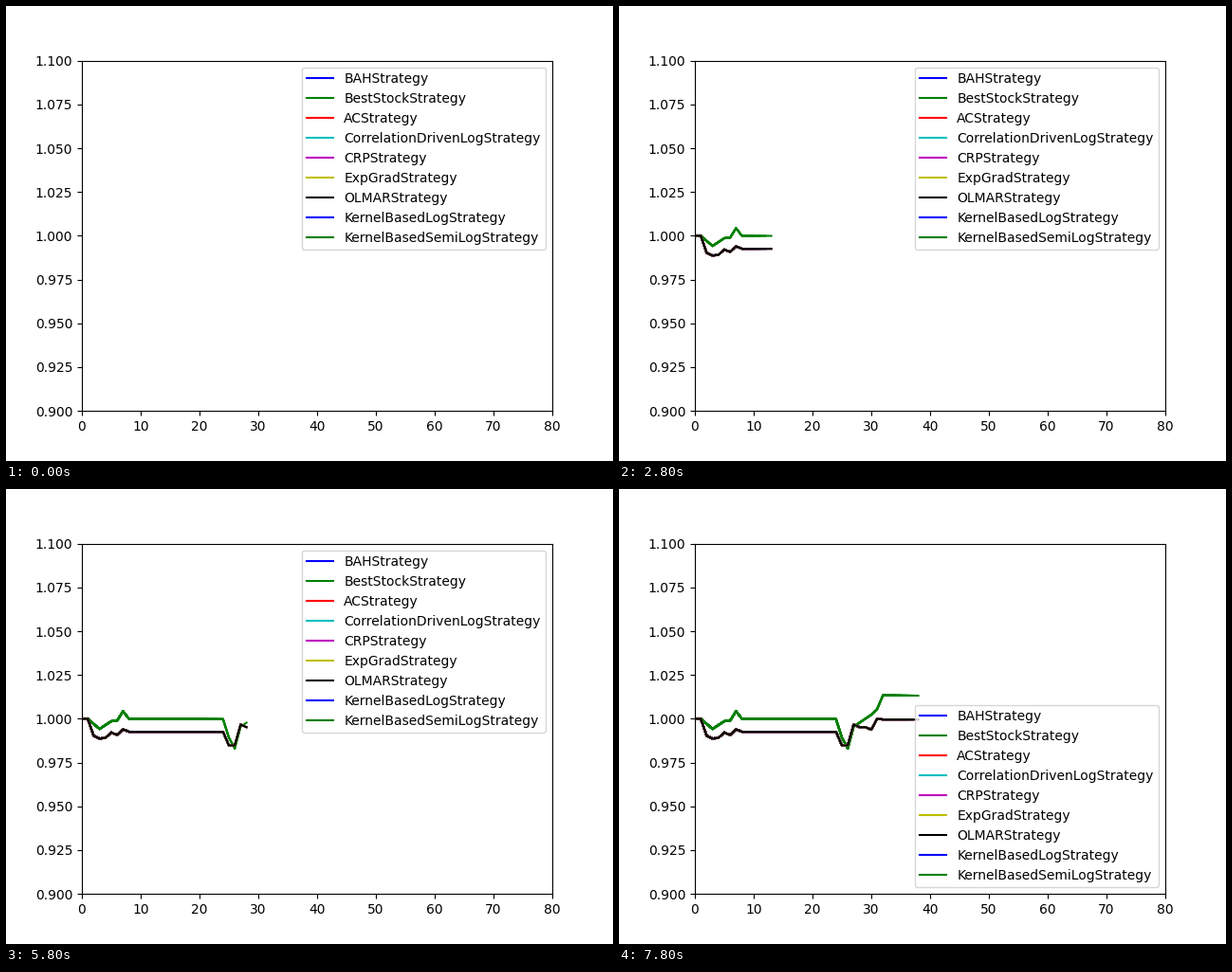
These frames come from a looping animation (640 px wide and 480 px high, 8 s). A matplotlib script:

```python
import numpy as np
import matplotlib.pyplot as plt
from matplotlib.animation import FuncAnimation

FRAMES = 40
STEP_MS = 200
DAYS = np.arange(FRAMES - 1)

STRATEGIES = [
    ("BAHStrategy", "b"),
    ("BestStockStrategy", "g"),
    ("ACStrategy", "r"),
    ("CorrelationDrivenLogStrategy", "c"),
    ("CRPStrategy", "m"),
    ("ExpGradStrategy", "y"),
    ("OLMARStrategy", "k"),
    ("KernelBasedLogStrategy", "b"),
    ("KernelBasedSemiLogStrategy", "g"),
]
ACTIVE = STRATEGIES[:7]  # the kernel strategies have no data yet


def wealth(turns):
    """Straight moves between turning points {day: gain in permille}."""
    return 1 + np.interp(DAYS, list(turns), list(turns.values())) / 1000


market = wealth({1: 0, 2: -9.7, 3: -11.3, 4: -10.9, 5: -7.9, 6: -9.2, 7: -6,
                 8: -7.4, 24: -7.4, 25: -15.2, 26: -15.2, 27: -3.3,
                 28: -4.8, 29: -4.8, 30: -6.2, 31: 0, 32: -0.4})
best = wealth({1: 0, 3: -5.8, 5: -1.4, 6: -1, 7: 4.3, 8: 0, 24: -0.2,
               25: -10.7, 26: -17, 27: -4.5, 30: 2.3, 31: 5.6, 32: 13.5,
               38: 13.2})

fig, ax = plt.subplots(figsize=(6.4, 4.8), dpi=100)
ax.set_xlim(0, 80)
ax.set_ylim(0.9, 1.1)

handles = [ax.plot([], [], color=c, label=name)[0] for name, c in STRATEGIES]
upper = ax.legend(handles=handles, loc="upper right")
ax.add_artist(upper)
lower = ax.legend(handles=handles, loc="lower right")


def plot_history(count):
    """Plot the first days of every active strategy."""
    curves = []
    for name, color in ACTIVE:
        values = best if name == "BestStockStrategy" else market
        curves += ax.plot(DAYS[:count], values[:count], color=color)
    return curves


# Each step plots the whole history again on top of the earlier curves.
layers = {count: plot_history(count) for count in range(2, FRAMES)}


def update(frame):
    for count, curves in layers.items():
        for curve in curves:
            curve.set_visible(count <= frame)
    # The legend moves down once the curves reach it.
    blocked = frame == FRAMES - 1
    upper.set_visible(not blocked)
    lower.set_visible(blocked)
    return []


anim = FuncAnimation(fig, update, frames=FRAMES, init_func=lambda: update(0),
                     interval=STEP_MS, repeat=True, repeat_delay=0,
                     blit=False)
plt.show()
```
